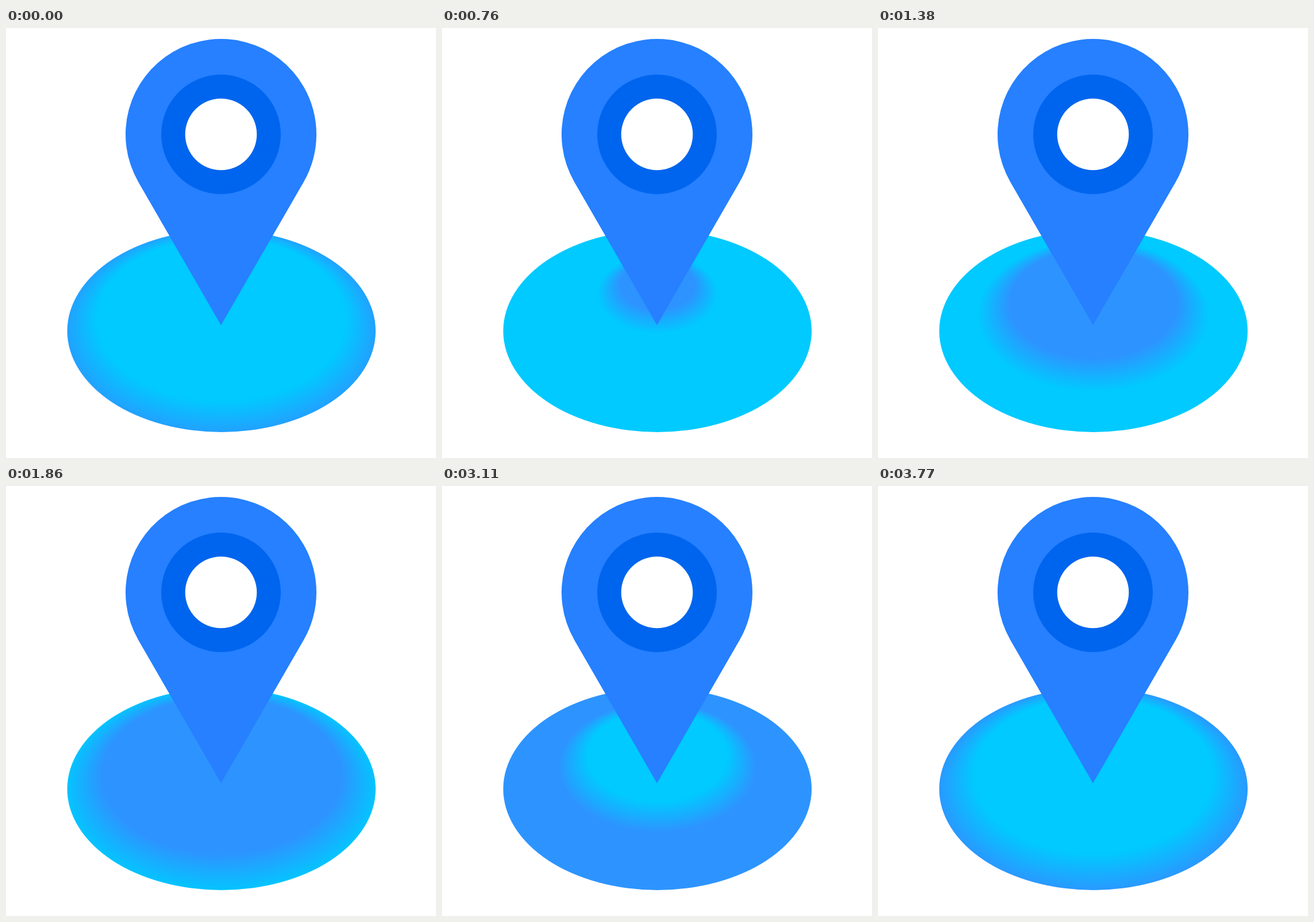
These frames come from a looping animation (748 by 748 pixels, 3.84 s). An HTML page with a canvas:

```html
<!DOCTYPE html>
<html lang="en">
<head>
<meta charset="utf-8">
<title>Map pin pulse</title>
<style>
  html, body { margin: 0; height: 100%; overflow: hidden; background: #fff; }
  canvas { display: block; }
</style>
</head>
<body>
<canvas width="748" height="748"></canvas>
<script>
const ctx = document.querySelector('canvas').getContext('2d');
const HALF = 1920;
const COLORS = ['#2d94ff', '#00caff'];
const FOCUS = -0.597; // where waves are born, in unit-disc space

function disc(x, y, r, fill) {
  ctx.fillStyle = fill;
  ctx.beginPath();
  ctx.arc(x, y, r, 0, 2 * Math.PI);
  ctx.fill();
}

// A soft-edged wave whose centre slides from the focus to the disc centre as it grows.
function wave(age, color, below) {
  const core = age / 2060 - 0.127;
  const inner = Math.max(0, core);
  const outer = 1.2 * core + 0.097;
  if (outer <= 0) return below;
  const centre = s => FOCUS * (1 - s);
  const g = ctx.createRadialGradient(0, centre(inner), inner, 0, centre(outer), outer);
  g.addColorStop(0, color);
  g.addColorStop(1, below);
  return g;
}

function drawGround(t) {
  const age = t % HALF;
  const young = Math.floor(t / HALF) % 2;
  const [fresh, old] = [COLORS[young], COLORS[1 - young]];
  ctx.save();
  ctx.translate(374.75, 527);
  ctx.scale(268.25, 176);
  disc(0, 0, 1, wave(age + HALF, old, fresh));
  // The next wave starts hidden behind the pin, once the last one has filled the disc.
  if (age > 350) {
    const clear = fresh === COLORS[0] ? 'rgba(45,148,255,0)' : 'rgba(0,202,255,0)';
    disc(0, 0, 1, wave(age, fresh, clear));
  }
  ctx.restore();
}

function drawPin() {
  const x = 374, y = 185, r = 166;
  ctx.fillStyle = '#2680ff';
  ctx.beginPath();
  ctx.arc(x, y, r, Math.PI * 5 / 6, Math.PI / 6);
  ctx.lineTo(x, y + 2 * r);
  ctx.fill();
  disc(x, y, 104, '#0065ee');
  disc(x, y, 62.3, '#fff');
}

function frame() {
  ctx.clearRect(0, 0, 748, 748);
  drawGround(performance.now() % (2 * HALF));
  drawPin();
  requestAnimationFrame(frame);
}
frame();
</script>
</body>
</html>
```
